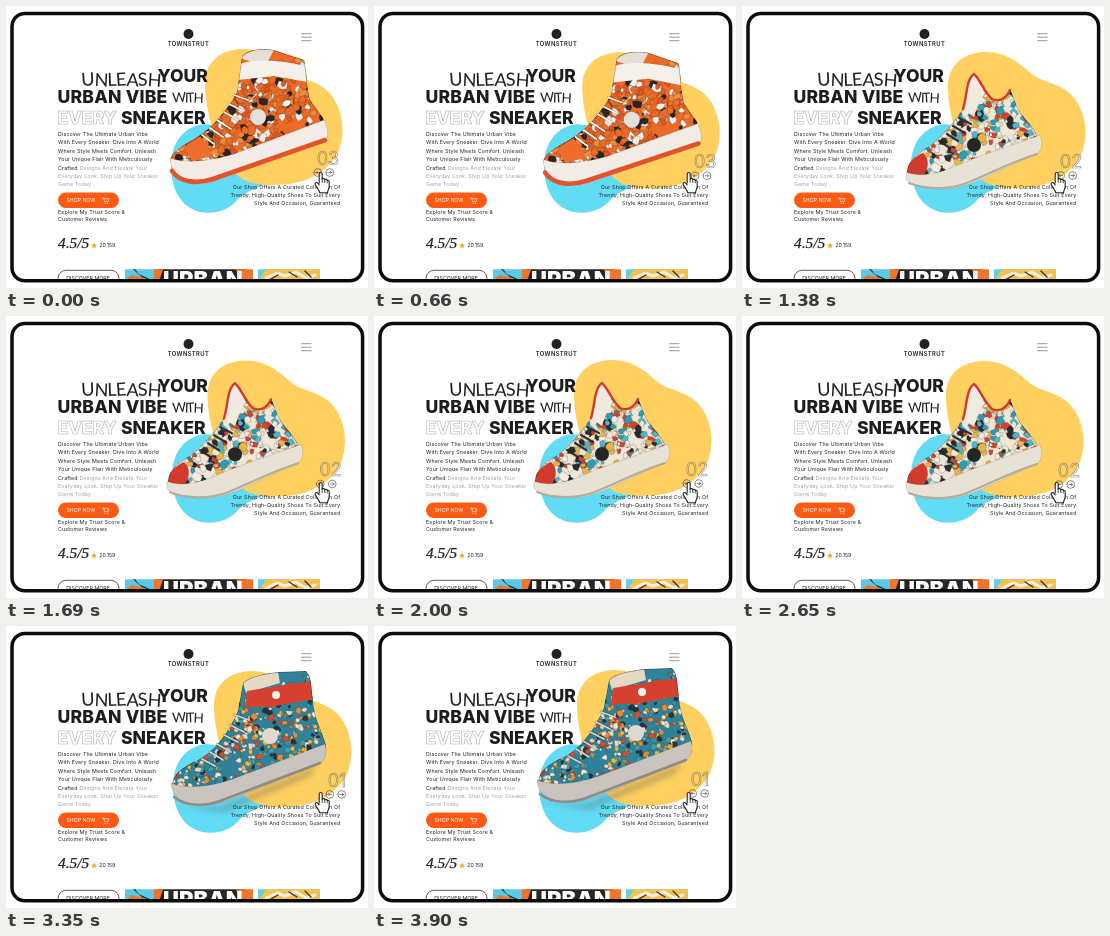
An HTML page that plays this animation: 362 px wide and 282 px high, repeating every 3.98 s.

```html
<!DOCTYPE html>
<html lang="en">
<head>
<meta charset="utf-8">
<title>Sneaker shop hero</title>
<style>
html, body { margin: 0; width: 100%; height: 100%; overflow: hidden; background: #fff; }
svg { display: block; width: 362px; height: 282px; }
text { font-family: Inter, "Open Sans", sans-serif; fill: #222; white-space: pre; }
.head { font-size: 17.6px; font-weight: 800; fill: #1d1d1d; }
.hand { font-family: Lato, "Open Sans", sans-serif; font-weight: 400; }
.copy { font-size: 5.3px; letter-spacing: .16px; }
.soft { fill: #a2a2a2; }
.hollow { fill: #fff; stroke: #aaa; stroke-width: .55; }
.line { fill: none; stroke-linecap: round; stroke-linejoin: round; }
</style>
</head>
<body>
<svg viewBox="0 0 362 282">
  <defs>
    <clipPath id="page"><rect x="6" y="7" width="350" height="268" rx="13"/></clipPath>
    <clipPath id="stage"><rect x="151" y="36" width="198" height="176"/></clipPath>
    <filter id="blur" x="-20%" y="-50%" width="140%" height="200%"><feGaussianBlur stdDeviation="3"/></filter>
  </defs>
  <g clip-path="url(#page)">
    <circle cx="182.5" cy="28" r="5" fill="#222"/>
    <text x="182.5" y="39.6" text-anchor="middle" font-size="5.8" font-weight="600" letter-spacing=".4">TOWNSTRUT</text>
    <path d="M295 27.7h10.5M295 31.2h10.5M295 34.7h10.5" stroke="#999" stroke-width="1"/>

    <g clip-path="url(#stage)">
      <path id="blue" fill="#62dcf5" d="M198 118C180 120 166 134 165 158C165 180 172 200 194 206C211 209 224 203 232 193C240 184 252 184 260 176L244 124Z"/>
      <path id="yellow" fill="#ffd05f" d="M199 80C198 58 212 44 236 43C260 43 272 56 284 66C297 75 314 74 326 90C337 105 340 128 332 146C323 164 304 176 282 178C258 181 238 178 228 166C214 150 200 112 199 80Z"/>
    </g>

    <text class="hand" x="75.5" y="80" font-size="18.2" letter-spacing="-.6" rotate="-3 3 -2 -4 3 -3 4">UNLEASH</text>
    <text class="head" x="151.5" y="76">YOUR</text>
    <text class="head" x="51.5" y="96.8" letter-spacing=".2">URBAN VIBE</text>
    <text class="hand" x="166.5" y="96.5" font-size="13.5" letter-spacing="-1.7" rotate="-4 2 -3 3">WITH</text>
    <text class="head hollow" x="51.5" y="117.8">EVERY</text>
    <text class="head" x="115" y="117.8">SNEAKER</text>

    <g class="copy">
      <text x="52" y="129.8">Discover The Ultimate Urban Vibe</text>
      <text x="52" y="138.3">With Every Sneaker. Dive Into A World</text>
      <text x="52" y="146.8">Where Style Meets Comfort. Unleash</text>
      <text x="52" y="155.3">Your Unique Flair With Meticulously</text>
      <text x="52" y="163.8">Crafted <tspan class="soft">Designs And Elevate Your</tspan></text>
      <text x="52" y="172.2" class="soft">Everyday Look. Step Up Your Sneaker</text>
      <text x="52" y="180.4" class="soft">Game Today</text>
      <text x="52" y="207.8">Explore My Trust Score &amp;</text>
      <text x="52" y="215.4">Customer Reviews</text>
    </g>

    <rect x="52" y="186.5" width="61" height="15.5" rx="7.75" fill="#ff5a14"/>
    <text x="60.5" y="196.3" font-size="5.2" style="fill:#fff">SHOP NOW</text>
    <path class="line" d="M96.5 191.8h1.2l.9 3.8h3.4l.8-2.8h-4.9" stroke="#fff" stroke-width=".6"/>
    <path d="M98.5 196.7h1v1h-1zM101.2 196.7h1v1h-1z" fill="#fff"/>

    <text x="52" y="241.5" font-size="15.4" font-style="italic" stroke="#222" stroke-width=".25" style="font-family:'Liberation Serif',serif">4.5/5</text>
    <path fill="#ffa62b" d="M88 236.7l.9 1.9 2 .2-1.5 1.4.4 2.1-1.8-1-1.8 1 .4-2.1-1.5-1.4 2-.2z"/>
    <text x="93.3" y="241.3" font-size="5.3">20.159</text>

    <rect x="52" y="264.3" width="61" height="16" rx="8" fill="#fff" stroke="#333" stroke-width=".8"/>
    <text x="60.3" y="273.8" font-size="5.3">DISCOVER MORE</text>
    <path fill="#58cbe4" d="M119 263.3h34v12h-34z"/>
    <path fill="#f0752d" d="M119 275l6-6 10 2 8 4z"/>
    <path fill="#2b2522" d="M129 263.3l4 5 9 4 6 3 4-12h88v12h-92l-12-4-9-8z"/>
    <path fill="#f0752d" d="M230 263.3h17v12h-13zM148 263.3h9l-4 12h-5z"/>
    <text x="157" y="281" font-size="22" font-weight="900" style="fill:#fff">URBAN</text>
    <path fill="#5bcfe6" d="M252 263.3h62v12h-62z"/>
    <path fill="#f5c04c" d="M252 275l8-11.7h54V275z"/>
    <path class="line" d="M260 272l11-5 8 3 11-4 10 6 9-3" stroke="#f4efe5" stroke-width="3"/>
    <path class="line" d="M265 273l7-4M283 266l8 5M299 265l6 6" stroke="#393330" stroke-width="1.4"/>

    <g id="shoes" clip-path="url(#stage)"></g>

    <g id="pager">
      <text id="num" class="hollow" x="322" y="158.5" font-size="18" text-anchor="middle" style="fill:none;stroke:#82796c"></text>
      <g id="arrows" class="line" stroke="#555" stroke-width=".7">
        <path d="M308 166.5a3.8 3.8 0 1 0 7.6 0a3.8 3.8 0 1 0-7.6 0M313.6 166.5h-3.6m1.4-1.4l-1.4 1.4 1.4 1.4"/>
        <path d="M320 166.5a3.8 3.8 0 1 0 7.6 0a3.8 3.8 0 1 0-7.6 0M322 166.5h3.6m-1.4-1.4l1.4 1.4-1.4 1.4"/>
      </g>
    </g>

    <g class="copy" text-anchor="end">
      <text x="334.3" y="182.7">Our Shop Offers A Curated Collection Of</text>
      <text x="334.3" y="190.9">Trendy, High-Quality Shoes To Suit Every</text>
      <text x="334.3" y="199.2">Style And Occasion, Guaranteed</text>
    </g>

    <path class="line" style="fill:#fff" stroke="#222" stroke-width="1.1" d="M313.2 177V168.2C313.2 166 316.2 166 316.2 168.2V173.2C317 172.2 318.6 172.4 318.8 173.7C319.8 172.9 321 173.3 321.2 174.5C322.4 174 323.3 174.8 323.2 176V180.5C323 183 321.8 184 321.4 186.8H313.8C313.2 184 310.6 181.6 309.2 178.6C308.6 176.8 310.6 175.8 311.8 177.2L313.2 178.8"/>
    <path class="line" d="M316.2 173v3.4M318.8 173.8v2.8M321.2 174.7v2.2" stroke="#222" stroke-width=".8"/>
  </g>
  <rect x="6" y="7.4" width="350.6" height="267.4" rx="13" fill="none" stroke="#0b0b0b" stroke-width="3.5"/>
</svg>
<script>
const LOOP = 3980;
const $ = id => document.getElementById(id);

function add(parent, tag, attrs) {
  const node = document.createElementNS("http://www.w3.org/2000/svg", tag);
  for (const key in attrs) node.setAttribute(key, attrs[key]);
  return parent.appendChild(node);
}

function random(seed) {
  return () => (seed = seed * 16807 % 2147483647) / 2147483647;
}

const models = [
  {
    base: "#ec6a28", patches: ["#ee6a25", "#f28b3c", "#2a2624", "#f3eee6", "#e2581f", "#ee6a25"], size: 5, seed: 41,
    upper: "M164 154C166 145 177 140 190 132C206 122 222 104 231 86L236 50C243 43 256 42 268 44L298 54C301 64 300 82 304 94L317 112L320 124L228 156L170 162Z",
    panels: [
      ["M234 52C243 43 256 42 268 44L262 55L246 56Z", "#e4ded4"],
      ["M233 58C250 52 276 54 299 60L301 76L268 70L232 74Z", "#f4f1ec"],
      ["M178 141L194 130C200 138 204 143 206 150L186 155Z", "#ef6d2a"]
    ],
    laces: "M196 129l12 9M204 122l13 9M211 114l14 9M218 106l14 8M223 98l14 7M228 89l14 5", laceColor: "#f7f4ee",
    sole: "M164 152C180 158 205 155 228 148L318 114C322 122 323 130 320 135C272 150 228 170 202 177C182 180 165 173 164 152Z", soleColor: "#f1ede6",
    tread: "M166 165C174 177 192 178 207 173L319 134", treadColor: "#e2522c", treadWidth: 4.6,
    marks: [[252, 111, 8, "#e4e1dd"]]
  },
  {
    base: "#efe6d6", patches: ["#2a9db4", "#f2ead8", "#d8402f", "#f4eee2", "#e9b548", "#2b2b2d", "#f0e6d4", "#4db9c8"], size: 4.8, seed: 77,
    upper: "M161 168C160 155 170 147 182 140C196 130 208 115 217 102C221 90 220 72 228 67C234 72 238 85 246 92C253 95 260 92 264 83C268 90 270 100 276 108C282 116 290 122 293 134L290 148L210 172L166 176Z",
    panels: [
      ["M217 102C221 90 220 72 228 67C232 72 235 80 239 86C233 94 230 102 228 110Z", "#f0eadf"],
      ["M161 170C160 156 168 150 177 146C184 152 184 164 172 174Z", "#d23a2e"]
    ],
    laces: "M193 134l11 7M201 127l11 7M207 119l12 7M213 111l12 6", laceColor: "#2b2b2d",
    sole: "M160 165C175 171 195 166 212 158C240 146 265 139 294 128C298 139 295 146 287 149C262 158 240 173 214 180C195 184 166 182 160 172Z", soleColor: "#e8e2d6",
    tread: "M163 176C180 183 203 182 218 177C242 168 262 156 291 147", treadColor: "#b7ab9b", treadWidth: 2,
    trim: ["M217 102C221 90 220 72 228 67C234 72 238 85 246 92C253 95 260 92 264 83", "#d53c30", 2.4],
    marks: [[228, 138, 7, "#252525"]]
  },
  {
    base: "#2f8298", patches: ["#2f93a8", "#d94a33", "#f0b440", "#efe5d2", "#27343c", "#e2d8c6", "#3f9fb2", "#e58a35"], size: 3.6, seed: 19, shadow: true,
    upper: "M164 158C164 146 174 138 188 132C206 124 220 104 230 82L235 54C242 47 256 45 270 43L298 42C304 48 303 60 305 72C306 90 315 104 318 116L318 126L215 160L168 166Z",
    panels: [
      ["M235 54C242 47 256 45 270 43L272 54L238 64Z", "#e6d9c4"],
      ["M239 62L303 52L305 70L262 78L237 78Z", "#d6402f"]
    ],
    laces: "M194 130l13 7M202 123l13 8M209 115l14 8M216 106l14 7M222 96l14 7M227 86l14 5", laceColor: "#d9d4cb",
    sole: "M163 154C180 161 205 157 225 150L317 115C320 125 317 132 310 136C270 150 235 168 208 175C188 179 164 174 163 154Z", soleColor: "#c9c4bd",
    tread: "M166 168C178 178 198 177 212 172L312 134", treadColor: "#918b85", treadWidth: 2.5,
    marks: [[262, 107, 8, "#ded9d1"], [268, 66, 4, "#f6f2ec"]]
  }
];

function buildShoe(model, i) {
  const shoe = add($("shoes"), "g", {});
  const rnd = random(model.seed);
  add(add(shoe, "clipPath", { id: "upper" + i }), "path", { d: model.upper });
  if (model.shadow) {
    add(shoe, "path", { d: "M165 174L212 178L310 136L300 148L215 184Z", fill: "#555", opacity: .35, filter: "url(#blur)" });
  }
  const body = add(shoe, "g", { "clip-path": `url(#upper${i})` });
  add(body, "path", { d: model.upper, fill: model.base });
  for (let k = 0; k < 600; k++) {
    const along = rnd();
    const cx = 162 + along * 158, cy = 150 - along * 70 + (rnd() - .5) * 90;
    const size = model.size * (.45 + rnd() * .65), turn = rnd() * 6.28;
    const points = [];
    for (let j = 0; j < 6; j++) {
      const a = turn + j * 1.047, r = size * (.5 + rnd() * .7);
      points.push((cx + Math.cos(a) * r).toFixed(1) + " " + (cy + Math.sin(a) * r).toFixed(1));
    }
    add(body, "path", { d: `M${points.join("L")}Z`, fill: model.patches[k % model.patches.length], stroke: "#2228", "stroke-width": .4 });
  }
  for (const [d, fill] of model.panels) add(body, "path", { d, fill });
  const stroke = (d, color, width) => add(shoe, "path", { d, class: "line", stroke: color, "stroke-width": width });
  add(body, "path", { d: model.upper, class: "line", stroke: "#0005", "stroke-width": 1.4 });
  stroke(model.laces, "#0005", 2.8);
  stroke(model.laces, model.laceColor, 1.8);
  if (model.trim) stroke(...model.trim);
  add(shoe, "path", { d: model.sole, fill: model.soleColor, stroke: "#0003", "stroke-width": .6 });
  stroke(model.tread, model.treadColor, model.treadWidth);
  for (const [cx, cy, r, fill] of model.marks) add(shoe, "circle", { cx, cy, r, fill });
  return shoe;
}
const shoes = models.map(buildShoe);

// First change, last change, number of changes
const bursts = [
  [580, 820, 4], [980, 1210, 4], [1380, 1840, 7], [1910, 2230, 5],
  [2650, 2720, 2], [2890, 3350, 7], [3420, 3900, 7]
];

// Time, slide, shoe x, y, turn, backdrop x, y, scale
const poses = [
  [0, 0, 0, 0, 0, 0, 0, 1],
  [580, 0, 2, 0, 0, 4, 1, 1],
  [740, 0, 6, 2, 1, 11, 4, 1],
  [820, 1, -14, 9, -10, -4, 7, .9],
  [980, 1, -13, 8, -10, -3, 7, .9],
  [1210, 1, 5, 1, 1, 11, 4, 1],
  [1380, 1, 4, 1, 0, 7, 3, 1],
  [2000, 1, 0, 0, 0, 1, 1, 1],
  [2230, 1, -1, 0, 0, 0, 0, 1],
  [2650, 1, 4, 1, 0, 5, 2, 1],
  [2720, 1, 7, 2, 1, 12, 4, 1],
  [2890, 2, -14, 9, -10, -3, 7, .9],
  [3120, 2, 3, 4, 1, 11, 4, 1],
  [3350, 2, 2, 3, 0, 9, 2, 1],
  [3900, 2, 0, 0, 0, 4, 1, 1]
];

function snap(t) {
  let shown = 0;
  for (const [from, to, n] of bursts) {
    if (t < from) break;
    const gap = (to - from) / (n - 1);
    shown = Math.min(to, from + Math.floor((t - from) / gap + .001) * gap);
  }
  return shown;
}

function poseAt(t) {
  let i = poses.length - 1;
  while (poses[i][0] > t + .5) i--;
  const a = poses[i], b = poses[i + 1];
  if (!b || a[1] !== b[1]) return a;
  const k = Math.max(0, (t - a[0]) / (b[0] - a[0]));
  const ease = k * (2 - k);
  return a.map((v, j) => v + (b[j] - v) * ease);
}

const move = (node, transform) => node.setAttribute("transform", transform);

function draw(now) {
  const [, slide, x, y, turn, bx, by, scale] = poseAt(snap(now % LOOP));
  shoes.forEach((shoe, i) => shoe.setAttribute("visibility", i === slide ? "visible" : "hidden"));
  move(shoes[slide], `translate(${x} ${y}) rotate(${turn} 164 170)`);
  move($("blue"), `translate(${x} 0)`);
  for (const id of ["yellow", "pager"]) move($(id), `translate(${bx} ${by}) scale(${scale})`);
  $("num").textContent = "0" + (3 - slide);
  move($("arrows"), `translate(${slide === 2 ? 3 : 0} 0)`);
}

const start = performance.now();
function tick() {
  draw(performance.now() - start);
  requestAnimationFrame(tick);
}
tick();
</script>
</body>
</html>
```
